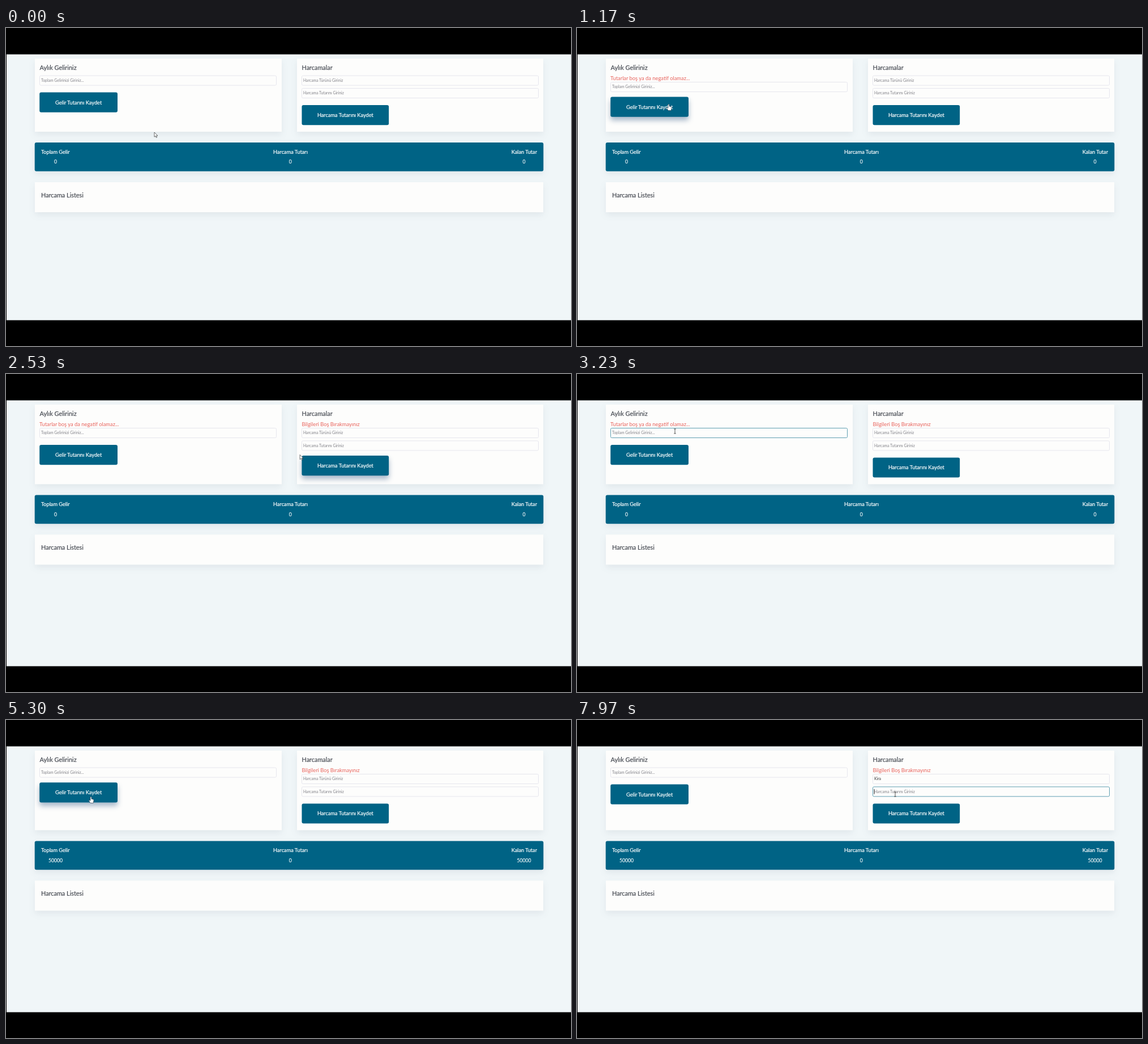
An HTML page for the animation above (8000 ms loop, 998 px wide and 561 px high).

```html
<!DOCTYPE html>
<html lang="tr">
<head>
<meta charset="utf-8">
<style>
  html, body { margin: 0; height: 100%; overflow: hidden; background: #000; }
  svg { display: block; width: 998px; height: 561px; }
  text { font: 9.2px Lato, "Open Sans", sans-serif; fill: #fff; stroke: #fff; stroke-width: .2px; }
  .heading { font-size: 10.9px; fill: #464a52; stroke: #464a52; }
  .error { font-size: 9.35px; fill: #e8635c; stroke: none; }
  .value { font-size: 6.85px; stroke: none; }
  .total { font-size: 8.7px; text-anchor: middle; stroke-width: .1px; }
  .middle { text-anchor: middle; }
  .end { text-anchor: end; }
  .panel { fill: #fdfdfc; filter: drop-shadow(0 5px 6px rgba(50, 60, 95, .08)); }
  .teal { fill: #006385; }
  .field { fill: #fdfdfc; stroke-width: 1; }
  .caret { stroke: #333; stroke-width: 1; }
  #pointer path { stroke-linejoin: round; }
</style>
</head>
<body>
<svg viewBox="0 0 998 561">
  <defs><clipPath id="page"><rect x="1" y="46.5" width="997" height="469"/></clipPath></defs>
  <g clip-path="url(#page)">
    <rect x="1" y="46" width="997" height="470" fill="#f0f6f8"/>
    <rect class="panel" id="incomePanel" x="51" y="54" width="436"/>
    <rect class="panel" id="expensePanel" x="514" y="54" width="435"/>
    <text class="heading" x="59.5" y="74">Aylık Geliriniz</text>
    <text class="heading" x="522.5" y="74">Harcamalar</text>
    <text class="error" id="incomeError" x="59" y="92.3">Tutarlar boş ya da negatif olamaz...</text>
    <text class="error" id="expenseError" x="522.5" y="92.3">Bilgileri Boş Bırakmayınız</text>
    <g id="incomeForm"></g>
    <g id="expenseForm"></g>
    <g id="summary">
      <rect class="teal" x="50.7" y="202" width="898.6" height="50.8" rx="3" style="filter:drop-shadow(0 5px 6px rgba(50,60,95,.08))"/>
      <text x="62" y="222">Toplam Gelir</text>
      <text class="middle" x="502.5" y="222">Harcama Tutarı</text>
      <text class="end" x="938" y="222">Kalan Tutar</text>
      <text class="total" id="income" x="87.5" y="239.3"></text>
      <text class="total" x="502.3" y="239.3">0</text>
      <text class="total" id="balance" x="915" y="239.3"></text>
      <rect class="panel" x="51" y="272" width="898" height="53"/>
      <text class="heading" x="62" y="298.7">Harcama Listesi</text>
    </g>
    <g id="pointer">
      <path id="arrow" d="M0 0V8.2L2 6.5 3.4 9.4 4.7 8.8 3.4 6H6Z" fill="#fff" stroke="#333" stroke-width=".7"/>
      <path id="hand" d="M-1 1Q0-.6 1 1V4.2L4 5Q5.2 5.3 5 6.6L4.3 11.5H-.8L-3.6 7.6Q-3.6 6-1.9 6.6L-1 7.4Z" fill="#fff" stroke="#234" stroke-width=".6"/>
      <path id="beam" d="M-1.8-4H1.8M0-4V4M-1.8 4H1.8" fill="none" stroke="#444" stroke-width=".9"/>
    </g>
  </g>
</svg>
<script>
const LOOP = 8000, ERROR_SHIFT = 11.4, LIFT = 3.4, BLINK = 360;
const $ = id => document.getElementById(id);
const clamp = v => Math.min(1, Math.max(0, v));
const smooth = v => (v = clamp(v)) * v * (3 - 2 * v);
const show = (el, on) => el.setAttribute('visibility', on ? 'inherit' : 'hidden');
const shift = (el, x, y) => el.setAttribute('transform', `translate(${x} ${y})`);

function svg(parent, tag, attrs, text = '') {
  const el = document.createElementNS('http://www.w3.org/2000/svg', tag);
  for (const name in attrs) el.setAttribute(name, attrs[name]);
  el.textContent = text;
  return parent.appendChild(el);
}

// keys: time at which each character of the typed value appears
function makeField(form, x, y, placeholder, focus, value = '', keys = []) {
  return {
    form, placeholder, focus, value, keys,
    box: svg(form, 'rect', { class: 'field', x: x + .5, y: y + .5, width: 418, height: 17, rx: 2 }),
    text: svg(form, 'text', { class: 'value', x: x + 3, y: y + 11.3 }),
    caret: svg(form, 'path', { class: 'caret', d: `M${x + 3} ${y + 4.5}v9` })
  };
}

function makeButton(form, x, y, width, label, hovers) {
  const el = svg(form, 'g', {});
  svg(el, 'rect', { class: 'teal', x, y, width, height: 35.2, rx: 3 });
  svg(el, 'text', { class: 'middle', x: x + width / 2, y: y + 20.9 }, label);
  return { el, hovers };
}

const incomeForm = $('incomeForm'), expenseForm = $('expenseForm');
const fields = [
  makeField(incomeForm, 59, 83.6, 'Toplam Gelirinizi Giriniz...', [2870, 4960], '50000', [3620, 3860, 3990, 4120, 4260]),
  makeField(expenseForm, 522, 83.6, 'Harcama Türünü Giriniz', [5790, 7960], 'Kira', [6700, 6900, 7100, 7270]),
  makeField(expenseForm, 522, 106, 'Harcama Tutarını Giriniz', [7960, LOOP])
];
const buttons = [
  makeButton(incomeForm, 59.2, 113.6, 137.8, 'Gelir Tutarını Kaydet', [[560, 1530], [4885, 5400]]),
  makeButton(expenseForm, 522.5, 136, 153.7, 'Harcama Tutarını Kaydet', [[1900, 2520]])
];
const INCOME_ERROR = [880, 4990], EXPENSE_ERROR = [2230, LOOP], SAVED = 4990;

// start, end, destination
const moves = [
  [30, 830, 162, 134], [1400, 2160, 590, 151], [2400, 2900, 173, 101],
  [4770, 4950, 150, 135], [5300, 5770, 557, 102.5], [7670, 7800, 562, 131]
];
const within = (t, [from, to]) => t >= from && t < to;

function pointerAt(t) {
  let x = 262, y = 184;
  for (const [from, to, toX, toY] of moves) {
    const p = smooth((t - from) / (to - from));
    x += (toX - x) * p;
    y += (toY - y) * p;
  }
  return [x, y];
}

function drawField(field, t) {
  const { focus, value, keys, placeholder, box, text, caret } = field;
  const count = keys.filter(k => t >= k).length;
  const typed = t >= SAVED && field === fields[0] ? '' : value.slice(0, count);
  const focused = within(t, focus);
  text.textContent = typed || placeholder;
  text.style.fill = typed ? '#333' : '#808087';
  box.setAttribute('stroke', focused ? '#5f9fb2' : '#e6e6ed');
  const since = t - (count ? keys[count - 1] : focus[0]);
  show(caret, focused && Math.floor(since / BLINK) % 2 === 0);
  shift(caret, typed ? text.getComputedTextLength() + .5 : 0, 0);
}

function drawButton({ el, hovers }, t) {
  const lift = hovers.reduce((sum, [on, off]) => sum + smooth((t - on) / 250) - smooth((t - off) / 250), 0);
  shift(el, 0, -LIFT * lift);
  el.style.filter = lift > 0 ? `drop-shadow(0 6px 5px rgba(45, 85, 130, ${.42 * lift}))` : 'none';
}

function draw(t) {
  const incomeError = within(t, INCOME_ERROR), expenseError = within(t, EXPENSE_ERROR);
  const incomeDrop = incomeError ? ERROR_SHIFT : 0;
  const expenseDrop = expenseError ? ERROR_SHIFT : 0;
  show($('incomeError'), incomeError);
  show($('expenseError'), expenseError);
  shift(incomeForm, 0, incomeDrop);
  shift(expenseForm, 0, expenseDrop);
  shift($('summary'), 0, expenseDrop);
  for (const id of ['incomePanel', 'expensePanel']) $(id).setAttribute('height', 129 + expenseDrop);
  $('income').textContent = $('balance').textContent = t >= SAVED ? '50000' : '0';
  fields.forEach(f => drawField(f, t));
  buttons.forEach(b => drawButton(b, t));

  const [x, y] = pointerAt(t);
  const onButton = buttons.some(b => b.hovers.some(h => within(t, h)));
  const onField = fields.some(({ form, box }) => {
    const left = box.x.baseVal.value;
    const top = box.y.baseVal.value + (form === incomeForm ? incomeDrop : expenseDrop);
    return x > left && x < left + 418 && y > top && y < top + 17;
  });
  shift($('pointer'), x, y);
  show($('hand'), onButton);
  show($('beam'), onField && !onButton);
  show($('arrow'), !onField && !onButton);
}

const start = performance.now();
function tick() {
  draw((performance.now() - start) % LOOP);
  requestAnimationFrame(tick);
}
tick();
</script>
</body>
</html>
```
